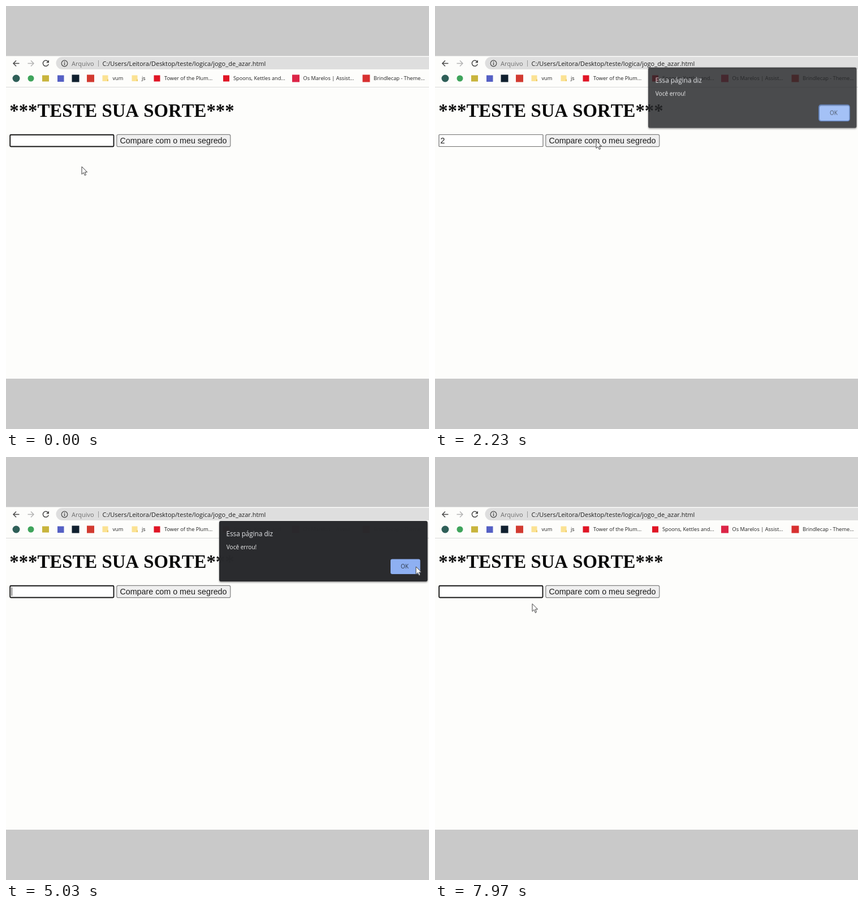
Recreate the animation shown at these times as an HTML page. Size 748 px wide and 748 px high, loop 8 s.

```html
<!DOCTYPE html>
<html lang="pt">
<head>
<meta charset="utf-8">
<title>Teste sua sorte</title>
<style>
html, body { margin: 0; width: 100%; height: 100%; overflow: hidden; background: #c9c9c9; }
svg { display: block; width: 100vw; height: 100vh; }
.ui { font-family: "Open Sans", "Noto Sans", sans-serif; }
.marks { font-size: 9.2px; fill: #202020; }
.form { font: 14.3px "Liberation Sans", Arial, sans-serif; fill: #1c1c1c; }
.heading { font: bold 32.8px "Liberation Serif", Times, serif; font-kerning: none; }
.line { fill: none; stroke: #4a4a4a; stroke-width: 1.5; }

/* Every part runs on the same 8 s clock. */
.pointer, .dialog, .ok, .ring, .focus, .blur, .digit, .caret, .compare {
  animation: 8s linear infinite;
}
.pointer { animation-name: move; }
.dialog { animation-name: popup; }
.ok { animation-name: ok-hover; }
.ring { animation-name: ring; }
.compare { animation-name: compare; }
.focus { animation-name: focus; }
.blur { animation-name: blur; }
.digit { animation-name: digit; }
.caret { animation-name: caret; }
.focus, .blur, .digit, .caret, .compare { animation-timing-function: step-end; }

@keyframes move {
  0%, 6% { transform: translate(134px, 284px); animation-timing-function: ease-in-out; }
  11%, 14% { transform: translate(172px, 264px); }
  18.375% { transform: translate(238px, 249px); animation-timing-function: ease-out; }
  24%, 30% { transform: translate(285px, 238px); animation-timing-function: ease-in-out; }
  39.5%, 43% { transform: translate(693px, 190px); animation-timing-function: ease-in-out; }
  56%, 63% { transform: translate(725px, 194px); animation-timing-function: ease-in-out; }
  72% { transform: translate(176px, 257px); }
  75.875% { transform: translate(172px, 260px); }
  81% { transform: translate(173px, 263px); }
  88%, 100% { transform: translate(172px, 259.5px); }
}
@keyframes popup {
  0%, 26.6% { opacity: 0; transform: translateY(-14px); animation-timing-function: ease-out; }
  27.875% { opacity: .84; transform: translateY(-5.5px); animation-timing-function: ease-out; }
  29.5%, 62.6% { opacity: 1; transform: none; }
  62.9% { opacity: .99; transform: translateY(-1px); animation-timing-function: ease-in; }
  65%, 100% { opacity: 0; transform: translateY(-14px); }
}
@keyframes ok-hover {
  0%, 39% { fill: #93b6f5; }
  40%, 60% { fill: #85a9e9; }
  62%, 100% { fill: #8db0f2; }
}
@keyframes ring {
  0%, 61% { opacity: 1; }
  62%, 100% { opacity: 0; }
}
@keyframes compare {
  0% { fill: #efefef; stroke: #808080; }
  18% { fill: #e4e4e4; stroke: #666; }
  25.6% { fill: #f5f5f5; stroke: #8d8d8d; }
  27% { fill: #efefef; stroke: #808080; }
}
@keyframes focus { 0% { opacity: 1; } 25.6% { opacity: 0; } 62.8%, 100% { opacity: 1; } }
@keyframes blur { 0% { opacity: 0; } 25.6% { opacity: 1; } 62.8%, 100% { opacity: 0; } }
@keyframes digit { 0% { opacity: 0; } 9.375% { opacity: 1; } 62.8%, 100% { opacity: 0; } }
@keyframes caret {
  0% { opacity: 0; transform: none; }
  9.375% { opacity: 1; transform: translateX(8px); }
  16% { opacity: 0; transform: translateX(8px); }
  22.625% { opacity: 1; transform: translateX(8px); }
  25.6% { opacity: 0; transform: none; }
  62.8% { opacity: 1; transform: none; }
  69.45% { opacity: 0; transform: none; }
  76.1% { opacity: 1; transform: none; }
  82.7% { opacity: 0; transform: none; }
  89.3% { opacity: 1; transform: none; }
  95.9%, 100% { opacity: 0; transform: none; }
}
</style>
</head>
<body>
<svg viewBox="0 0 748 748">
  <defs>
    <filter id="shadow" x="-5%" y="-10%" width="110%" height="125%" color-interpolation-filters="sRGB">
      <feDropShadow dx="0" dy="1.5" stdDeviation="1.5" flood-opacity=".45"/>
    </filter>
    <g id="folder">
      <path d="M0 1h10v10.5H0z" fill="#fbe293"/>
      <path d="M8.5 8h2v3.5h-2z" fill="#edc965"/>
    </g>
  </defs>

  <rect width="748" height="748" fill="#c9c9c9"/>
  <rect y="88.5" width="748" height="570.5" fill="#fdfdfb"/>

  <!-- Address bar -->
  <path d="M748 90H99.5a11 11 0 0 0 0 22H748z" fill="#dedede"/>
  <path class="line" d="M23.5 101.5H13M18 96.5l-5 5 5 5"/>
  <path class="line" d="M38.5 101.5H49M44 96.5l5 5-5 5" style="stroke:#b5b5b5"/>
  <path class="line" d="M74.5 98.5a5 5 0 1 0 .7 4.2"/>
  <path d="M76 95.5v5h-5z" fill="#4a4a4a"/>
  <circle class="line" cx="103.5" cy="101.5" r="5.3" style="stroke-width:1.2"/>
  <path class="line" d="M103.5 98.2v1.5M103.5 100.8v3.8"/>
  <path d="M163.5 96v11" stroke="#999"/>
  <g class="ui">
    <text x="116" y="105.5" font-size="11" fill="#707070">Arquivo</text>
    <text x="170.5" y="105.5" font-size="10.97" fill="#202020">C:/Users/Leitora/Desktop/teste/logica/jogo_de_azar.html</text>
  </g>

  <!-- Bookmarks -->
  <circle cx="18" cy="128" r="6.5" fill="#2f5f58"/>
  <circle cx="44" cy="128" r="5.5" fill="#3fa45b"/>
  <rect x="64" y="122.5" width="12" height="11" fill="#c8b43c"/>
  <rect x="91" y="122.5" width="11.5" height="11.5" fill="#5560c4"/>
  <rect x="116.5" y="121.5" width="13" height="13" fill="#10202f"/>
  <rect x="143" y="121.5" width="13" height="13" fill="#d23a30"/>
  <use href="#folder" x="170.5" y="121.5"/>
  <use href="#folder" x="222.5" y="121.5"/>
  <rect x="261.5" y="122.5" width="11" height="11" fill="#e01525"/>
  <rect x="384" y="122.5" width="11" height="11" fill="#e01525"/>
  <rect x="506" y="121.5" width="13" height="13" fill="#dc2547"/>
  <rect x="630.5" y="121.5" width="13" height="13" fill="#d83030"/>
  <g class="ui marks">
    <text x="188.5" y="131.3">vum</text>
    <text x="240" y="131.3">js</text>
    <text x="280" y="131.3">Tower of the Plum...</text>
    <text x="402" y="131.3">Spoons, Kettles and...</text>
    <text x="525.5" y="131.3">Os Marelos | Assist...</text>
    <text x="650" y="131.3">Brindlecap - Theme...</text>
  </g>
  <path d="M0 143.5h748" stroke="#dadada"/>

  <!-- Page -->
  <text class="heading" x="6.3" y="196.2" fill="#0c0c0c">***TESTE SUA SORTE***</text>
  <rect class="blur" x="7" y="227.5" width="184" height="21" rx="1" fill="#fff" stroke="#707070" stroke-width="1.2"/>
  <rect class="focus" x="7.2" y="227.7" width="183.3" height="20.8" rx="1.5" fill="#fff" stroke="#161616" stroke-width="1.9"/>
  <rect class="compare" x="195.8" y="227.3" width="201" height="21.4" rx="2.5" stroke-width="1.2"/>
  <g class="form">
    <text class="digit" x="9.5" y="243">2</text>
    <text x="201.4" y="243">Compare com o meu segredo</text>
  </g>
  <path class="caret" d="M10.3 230.5v15" stroke="#222"/>

  <!-- Alert -->
  <g class="dialog">
    <rect x="377" y="114" width="368.5" height="107" rx="3" fill="#28292c" filter="url(#shadow)"/>
    <g class="ui">
      <text x="389.5" y="141" font-size="11.7" fill="#e6e8eb">Essa página diz</text>
      <text x="389.8" y="164.2" font-size="10.05" fill="#f4f4f4">Você errou!</text>
      <rect class="ring" x="679" y="180.5" width="54" height="28" rx="3.5" fill="none" stroke="#4f7ed0" stroke-width="1.5"/>
      <rect class="ok" x="680" y="181.5" width="52.5" height="26.5" rx="3"/>
      <text x="698" y="198.3" font-size="10" fill="#2b3547">OK</text>
    </g>
  </g>

  <path class="pointer" d="M0 0V13.5L3.2 10.6 5.3 15.5 7.5 14.6 5.4 9.8H9.6Z" fill="#fff" stroke="#3c3c3c" stroke-linejoin="round"/>
</svg>
</body>
</html>
```
